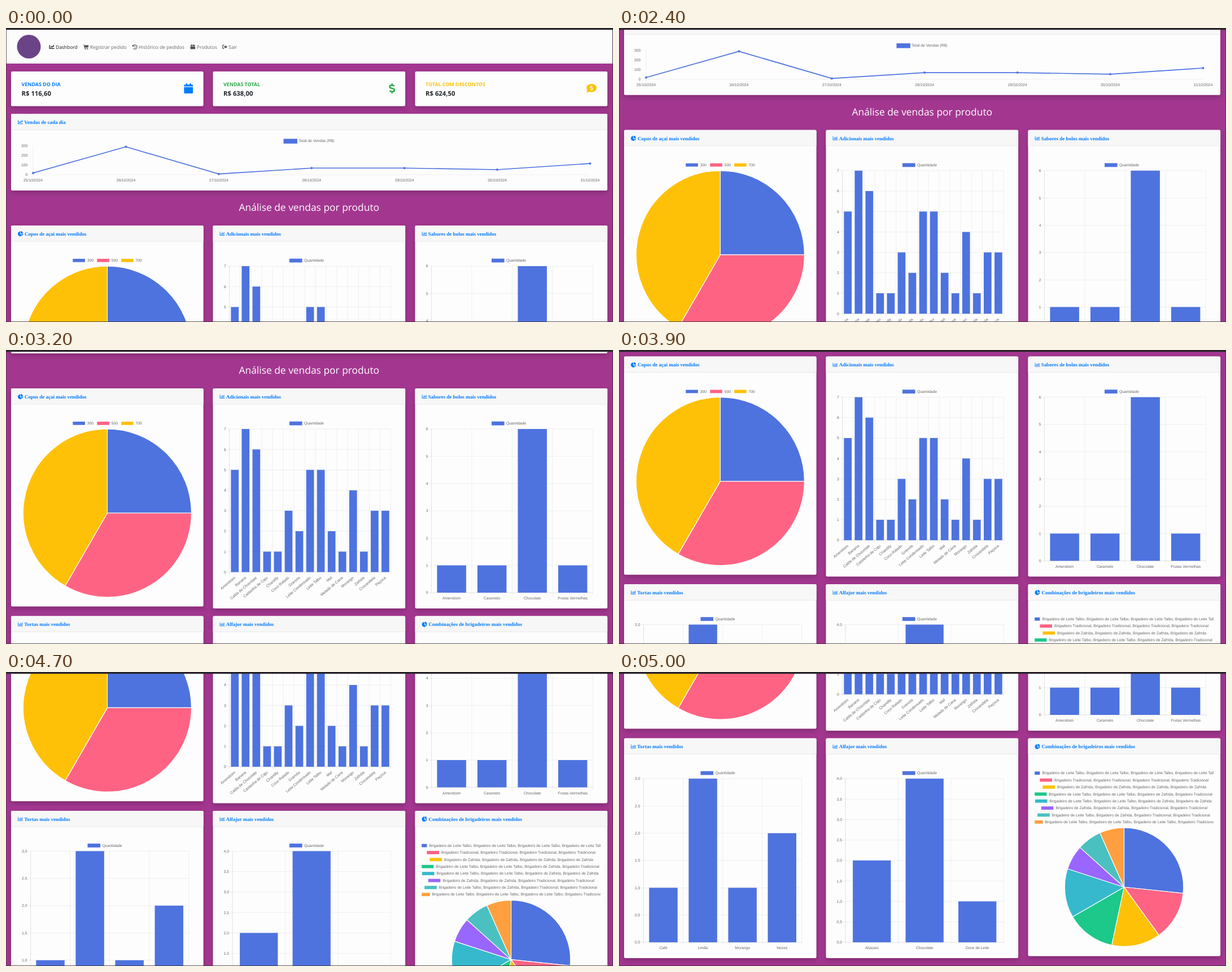
An HTML page that plays this animation: 1075x521 px, repeating every 6500 ms.

```html
<!DOCTYPE html>
<html lang="pt-BR">
<head>
<meta charset="utf-8">
<title>Painel de vendas</title>
<style>
  html, body { margin: 0; width: 100%; height: 100%; overflow: hidden; background: #a33790; }
  svg { display: block; width: 100%; height: 100%; text-rendering: geometricPrecision; }
  text { white-space: pre; }
  .ui { font-family: "Open Sans", "Noto Sans", sans-serif; }
  .head { font: bold 9.02px "Liberation Serif", "Times New Roman", serif; fill: #007bff; }
  .chart { font: 6.77px "Liberation Sans", Arial, sans-serif; fill: #666; }
  .card { filter: drop-shadow(0 4.5px 4.5px rgba(0, 0, 0, .2)); }
  .grid { fill: none; stroke: #000; stroke-opacity: .1; stroke-width: .6; }
</style>
</head>
<body>
<svg id="stage" viewBox="0 0 1075 521" xmlns="http://www.w3.org/2000/svg"></svg>
<script>
const BLUE = '#4e73df', PINK = '#ff6384', YELLOW = '#ffc107', LINK = '#007bff';
const LOOP = 6500, NOTCH = 56.4, PAGE_END = 636;
const SCROLL_TIMES = [2200, 2300, 2400, 2900, 3200, 3900, 4100, 4200, 4700, 4800, 4900, 5000];
const COLS = [9, 366.5, 724.5], COL_W = 340.6;

const rect = (x, y, w, h, fill, extra = '') =>
  `<rect x="${x}" y="${y}" width="${w}" height="${h}" fill="${fill}" ${extra}/>`;
const text = (x, y, s, cls, extra = '') => `<text x="${x}" y="${y}" class="${cls}" ${extra}>${s}</text>`;
const label = (x, y, s, anchor = 'start') => text(x, y + 2.4, s, 'chart', `text-anchor="${anchor}"`);
const ui = (x, y, s, size, fill, weight = 400, extra = '') =>
  text(x, y, s, 'ui', `font-size="${size}" font-weight="${weight}" fill="${fill}" ${extra}`);
const at = (x, y, body, color) => `<g transform="translate(${x} ${y})" color="${color}">${body}</g>`;
const fillPath = d => `<path d="${d}" fill="currentColor"/>`;
const strokePath = (d, w) => `<path d="${d}" fill="none" stroke="currentColor" stroke-width="${w}" stroke-linejoin="round"/>`;

// Icons sit in a 9 x 9 box unless they are centred on the origin.
const icons = {
  line: strokePath('M.6 1.1V7.3H9', 1.15) + strokePath('M2.1 5.3L3.8 3.6L5.3 5L7.7 2.5', 1.15) + fillPath('M6 1.7H8.5V4.2Z'),
  bar: strokePath('M.5 1.1V7.4H9', .9) + strokePath('M2.4 6.1V4.3M4.1 6.1V2.1M5.8 6.1V3.3M7.5 6.1V1.6', 1),
  pie: fillPath('M4.1.3V4.8L7.3 8A4.4 4.4 0 1 1 4.1.3Z') + fillPath('M5 0A4.2 4.2 0 0 1 9 4.1H5Z') + fillPath('M5.4 5H9.2A4.2 4.2 0 0 1 8 7.6Z'),
  cart: fillPath('M0 .4H2L2.3 1.6H10L9 5.6H3.4L3.6 6.5H8.7V7.3H2.8L1.4 1.3H0Z') +
    '<circle cx="3.9" cy="8.2" r=".95" fill="currentColor"/><circle cx="8" cy="8.2" r=".95" fill="currentColor"/>',
  history: strokePath('M1.3 2.7A3.8 3.8 0 1 1 1.8 7.1', 1.1) + fillPath('M.2.6V3.8H3.4Z') + strokePath('M4.6 2.4V4.8L6.2 6', 1),
  box: fillPath('M1.4.4H4.1V3.2H.2Z') + fillPath('M4.7.4H7.4L8.7 3.2H4.7Z') + fillPath('M.2 3.8H8.7V8.4H.2Z'),
  exit: strokePath('M3.4 1.4H1.2Q.6 1.4.6 2V6.8Q.6 7.4 1.2 7.4H3.4', 1.1) + fillPath('M2.7 3.4H5.4V1.4L9 4.4L5.4 7.4V5.4H2.7Z'),
  calendar: fillPath('M-7.9-3.4V-5.1Q-7.9-6.8-6.2-6.8H-4.5V-9H-2.3V-6.8H2.3V-9H4.5V-6.8H6.2Q7.9-6.8 7.9-5.1V-3.4Z') +
    fillPath('M-7.9-2.3H7.9V7.3Q7.9 9 6.2 9H-6.2Q-7.9 9-7.9 7.3Z'),
  dollar: strokePath('M4.2-4.2C2.7-5.4 1-5.5-.8-5.5H-1.3C-5-5.5-5-1.4-2-.6L2 .6C5 1.4 5 5.5 1.3 5.5H-.8C-2 5.5-3 5.2-4.2 4.2', 2.5) +
    strokePath('M0-9V-6M0 6V9', 2.1)
};
icons.comment = '<ellipse cy="-.6" rx="9" ry="7.3" fill="currentColor"/>' + fillPath('M-7.6 2C-7.4 4.6-8 6-9 7.6C-6.6 7.6-4.8 6.8-3.6 5.6Z') +
  `<g transform="translate(0 -.6) scale(.52)" color="#fff">${icons.dollar}</g>`;

function card(x, y, w, h, icon, title) {
  let out = `<g class="card">${rect(x, y, w, h, '#fdfdfd', 'rx="2.3"')}</g>`;
  if (title) {
    out += `<path d="M${x} ${y + 28}V${y + 2.3}q0-2.3 2.3-2.3H${x + w - 2.3}q2.3 0 2.3 2.3V${y + 28}Z" fill="#f7f7f7"/>`
      + rect(x, y + 27.8, w, .6, '#dedede')
      + at(x + 12, y + 10.1, icons[icon], LINK)
      + text(x + (icon === 'pie' ? 23.9 : 23.2), y + 17.8, title, 'head');
  }
  return out;
}

function navbar() {
  const items = [
    [76.5, 88, 'line', 'Dashbord'], [136.5, 148.8, 'cart', 'Registrar pedido'],
    [223.5, 234.8, 'history', 'Histórico de pedidos'], [326.3, 337.8, 'box', 'Produtos'], [383, 394, 'exit', 'Sair']
  ];
  return rect(0, 0, 1075, 63, '#fcfcfc') + '<circle cx="40.5" cy="33" r="21" fill="#6b4387"/>'
    + items.map(([ix, tx, icon, s], i) => {
      const color = i ? '#666' : '#1a1a1a';
      return at(ix, 29, icons[icon], i ? '#505050' : color) + ui(tx, 36.8, s, 8.45, color);
    }).join('');
}

function totals() {
  const items = [
    ['VENDAS DO DIA', 'R$ 116,60', LINK, 'calendar', 323.2],
    ['VENDAS TOTAL', 'R$ 638,00', '#28a745', 'dollar', 683.7],
    ['TOTAL COM DESCONTOS', 'R$ 624,50', YELLOW, 'comment', 1037]
  ];
  return items.map(([name, value, color, icon, ix], i) =>
    card(COLS[i], 77, COL_W, 61.5)
    + ui(COLS[i] + 18.6, 103.2, name, 8.85, color, 700)
    + ui(COLS[i] + 18.6, 120, value, 11.28, '#212529', 700)
    + at(ix, 107, icons[icon], color)).join('');
}

function dailySales() {
  const values = [18, 291, 8, 69, 69, 53, 116.6];
  const px = i => 48 + i * 164.4, py = v => 260 - v * .17;
  let out = card(9, 152.3, 1056, 135.7, 'line', 'Vendas de cada dia')
    + rect(491.5, 196.4, 24.4, 8.4, BLUE) + label(518.2, 200, 'Total de Vendas (R$)')
    + '<path class="grid" d="M48 209V264.5M43.5 260H1034.4"/>';
  for (let v = 0; v <= 300; v += 100) out += label(38.2, py(v), v, 'end');
  const points = values.map((v, i) => `${px(i)},${py(v)}`).join(' ');
  out += `<polyline points="${points}" fill="none" stroke="${BLUE}" stroke-width="1.7" stroke-linejoin="round"/>`;
  values.forEach((v, i) => {
    out += `<circle cx="${px(i)}" cy="${py(v)}" r="2" fill="${BLUE}"/>`
      + label(px(i), 270, `${25 + i}/10/2024`, 'middle');
  });
  return out;
}

function bars({ left, right, top, bottom, max, step, values, names, legend, slanted }) {
  const slot = (right - left) / values.length, unit = (bottom - top) / max;
  let grid = '', out = rect(legend, top - 13.3, 22.6, 6.8, BLUE) + label(legend + 26, top - 10.1, 'Quantidade');
  for (let v = 0; v <= max; v += step) {
    const y = bottom - v * unit;
    grid += `M${left - 4.5} ${y}H${right}`;
    out += label(left - 6, y, step < 1 ? v.toFixed(1).replace('.', ',') : v, 'end');
  }
  for (let i = 0; i <= values.length; i++) grid += `M${left + i * slot} ${top}V${bottom + 4.5}`;
  out += `<path class="grid" d="${grid}"/><path class="grid" d="M${left} ${top}V${bottom}H${right}"/>`;
  values.forEach((v, i) => {
    const mid = left + (i + .5) * slot;
    out += rect(mid - slot * .36, bottom - v * unit, slot * .72, v * unit, BLUE);
    out += slanted
      ? `<g transform="translate(${mid} ${bottom + 9}) rotate(-40)">${label(0, 0, names[i], 'end')}</g>`
      : label(mid, bottom + 10, names[i], 'middle');
  });
  return out;
}

function pie(cx, cy, r, parts, colors) {
  const total = parts.reduce((a, b) => a + b);
  const edge = n => {
    const a = n / total * Math.PI * 2;
    return `${cx + r * Math.sin(a)} ${cy - r * Math.cos(a)}`;
  };
  let sum = 0;
  return parts.map((n, i) => {
    const start = edge(sum);
    sum += n;
    return `<path d="M${cx} ${cy}L${start}A${r} ${r} 0 0 1 ${edge(sum)}Z" fill="${colors[i]}" stroke="#fff" stroke-width="1.15"/>`;
  }).join('');
}

function productRow() {
  const [a, b, c] = COLS, top = 422;
  const cupColors = [BLUE, PINK, YELLOW];
  return card(a, 350, COL_W, 386.6, 'pie', 'Copos de açaí mais vendidos')
    + cupColors.map((color, i) => rect(118.3 + i * 42.9, 409, 21.6, 5.8, color) + label(143.8 + i * 42.9, 411.8, 300 + i * 200)).join('')
    + pie(179.4, 571, 149, [3, 4, 5], cupColors)
    + card(b, 350, COL_W, 390, 'bar', 'Adicionais mais vendidos')
    + bars({
      left: 395.7, right: 681.4, top, bottom: 675.5, max: 7, step: 1, legend: 502, slanted: true,
      values: [5, 7, 6, 1, 1, 3, 2, 5, 5, 2, 1, 4, 1, 3, 3],
      names: ['Amendoim', 'Banana', 'Calda de Chocolate', 'Castanha de Caju', 'Chantilly', 'Coco Ralado', 'Granola',
        'Leite Condensado', 'Leite Talbo', 'Mel', 'Melado de Cana', 'Morango', 'Zafrida', 'Crocandela', 'Paçoca']
    })
    + card(c, 350, COL_W, 390, 'bar', 'Sabores de bolos mais vendidos')
    + bars({
      left: 753.4, right: 1039.4, top, bottom: 712, max: 6, step: 1, legend: 860,
      values: [1, 1, 6, 1], names: ['Amendoim', 'Caramelo', 'Chocolate', 'Frutas Vermelhas']
    });
}

function comboChart() {
  const flavors = { L: 'de Leite Talbo', T: 'Tradicional', N: 'de Zafrida' };
  const rows = [
    ['LLLL', 749.4, BLUE, 4], ['TTTT', 771, PINK, 2], ['NNNN', 776, YELLOW, 2], ['LLNT', 761.3, '#1cc88a', 2],
    ['LLNN', 762.5, '#36b9cc', 2], ['NNTT', 773.4, '#9966ff', 1], ['LNTT', 766.8, '#4bc0c0', 1], ['LLLT', 754.6, '#ff9f40', 1]
  ];
  const legend = rows.map(([code, x, color], i) => {
    const y = 815 + i * 12.38;
    const name = [...code].map(k => 'Brigadeiro ' + flavors[k]).join(', ');
    return rect(x - 25.6, y - 2.7, 21.6, 5.8, color) + label(x, y, name);
  }).join('');
  return `<clipPath id="legendClip"><rect x="736.2" y="800" width="316.6" height="120"/></clipPath>
    <g clip-path="url(#legendClip)">${legend}</g>`
    + pie(894.5, 1017.2, 105.2, rows.map(r => r[3]), rows.map(r => r[2]));
}

function sweetsRow() {
  const [a, b, c] = COLS, y = 753.5, top = 825, bottom = 1115;
  return card(a, y, COL_W, 389.5, 'bar', 'Tortas mais vendidos')
    + bars({
      left: 43.5, right: 323.8, top, bottom, max: 3, step: .5, legend: 144.5,
      values: [1, 3, 1, 2], names: ['Café', 'Limão', 'Morango', 'Nozes']
    })
    + card(b, y, COL_W, 389.5, 'bar', 'Alfajor mais vendidos')
    + bars({
      left: 401, right: 681.4, top, bottom, max: 4, step: .5, legend: 502,
      values: [2, 4, 1], names: ['Abacaxi', 'Chocolate', 'Doce de Leite']
    })
    + card(c, y, COL_W, 386, 'pie', 'Combinações de brigadeiros mais vendidos')
    + comboChart();
}

document.getElementById('stage').innerHTML = rect(0, 0, 1075, 521, '#a33790')
  + '<g id="page">' + navbar() + totals() + dailySales()
  + ui(536.8, 324, 'Análise de vendas por produto', 17.4, '#fff', 500, 'text-anchor="middle"')
  + productRow() + sweetsRow() + '</g>'
  + rect(0, 0, 1075, 3.2, '#28232a')
  + rect(0, 3, .8, 518, '#4a3048') + rect(1074, 3, 1, 518, '#4a3048') + rect(0, 520.2, 1075, .8, '#3a2a3a');

const page = document.getElementById('page');

function draw(now) {
  const t = now % LOOP;
  const notches = SCROLL_TIMES.filter(s => t >= s).length;
  page.setAttribute('transform', `translate(0 ${-Math.min(notches * NOTCH, PAGE_END)})`);
  requestAnimationFrame(draw);
}
draw(performance.now());
</script>
</body>
</html>
```
